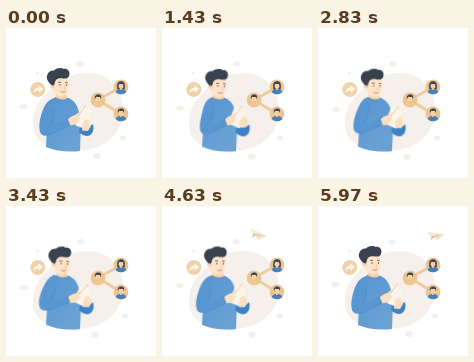
These frames come from a looping animation (150 by 150 pixels, 6030 ms). An HTML page:

```html
<!DOCTYPE html>
<html lang="en">
<head>
<meta charset="utf-8">
<title>Sharing with a network</title>
<style>
html, body { margin: 0; width: 100%; height: 100%; overflow: hidden; background: #fff; }
svg { display: block; width: 100vw; height: 100vh; }
svg * { transform-box: view-box; }
.lean, .head, .pad, .grip, .arm, .plane { animation: 6030ms ease-in-out infinite; }
.lean { transform-origin: 57px 123px; animation-name: lean; }
.head { transform-origin: 55px 68px; animation-name: nod; }
.pad { transform-origin: 77px 94px; animation-name: tilt; }
.grip { animation-name: grip; }
.arm { transform-origin: 68px 92px; animation-name: arm; }
.plane { animation-name: fly; animation-timing-function: linear; }
.float { animation: float 6030ms ease-in-out infinite; }
.right { --x: 2px; --y: 0px; }
.left { --x: .5px; --y: 3px; }
.low { --x: -2px; --y: 1px; }
.high { --x: 1px; --y: -.3px; }

@keyframes float { 45% { transform: translate(var(--x), var(--y)); } }
@keyframes lean {
  0%, 84.5%, 100% { transform: rotate(0deg); }
  8.3%, 37%, 69.2% { transform: rotate(.9deg); }
  57% { transform: rotate(.6deg); }
}
@keyframes nod {
  0%, 84.5%, 100% { transform: rotate(0deg); }
  8.3%, 37%, 69.2% { transform: translate(.4px, 1px) rotate(2.5deg); }
  57% { transform: translateY(.6px) rotate(2.5deg); }
}
@keyframes tilt {
  0%, 84.5%, 100% { transform: rotate(0deg); }
  8.3%, 37%, 69.2% { transform: translate(-3px, -1.5px) rotate(3deg); }
  57% { transform: translate(-1.5px, -1px) rotate(5deg); }
}
@keyframes grip {
  0%, 84.5%, 100% { transform: translate(-2px, 4px); }
  8.3%, 37%, 69.2% { transform: translate(-1px, 0); }
  57% { transform: translate(-1.5px, 2px); }
}
@keyframes arm {
  0%, 84.5%, 100% { transform: none; }
  8.3%, 37% { transform: rotate(3deg) scaleX(.87); }
  57% { transform: rotate(6deg) scaleX(1); }
  69.2% { transform: rotate(3deg) scaleX(.96); }
}
@keyframes fly {
  0%, 61.9% { opacity: 0; transform: translate(36px, 52px) rotate(-50deg) scale(.4); }
  64.7% { opacity: 1; transform: translate(48px, 34px) rotate(-32deg) scale(.85); }
  69.2% { opacity: 1; transform: translate(67px, 25px) rotate(2deg); }
  74.1% { opacity: 1; transform: translate(88px, 27px) rotate(10deg); }
  79.5% { opacity: 1; transform: translate(104px, 30px) rotate(11deg); }
  84.6% { opacity: 1; transform: translate(115px, 31px) rotate(6deg); }
  94.5%, 100% { opacity: 1; transform: translate(118px, 29.5px) rotate(-8deg); }
}
</style>
</head>
<body>
<svg viewBox="0 0 150 150" aria-hidden="true">
  <defs>
    <linearGradient id="knit" x1="0" y1="0" x2=".6" y2="1">
      <stop offset="0" stop-color="#5595d1"/>
      <stop offset="1" stop-color="#6aa2d4"/>
    </linearGradient>
  </defs>

  <!-- backdrop -->
  <g fill="#f5f0eb">
    <path d="M27 97C27 78 34 72 46 60C57 49 69 45 82 45C103 45 117 61 117 82C117 106 98 123 70 123C45 123 27 115 27 97Z"/>
    <ellipse class="float high" cx="74" cy="36" rx="3.7" ry="2.8"/>
    <ellipse class="float left" cx="17.5" cy="78.5" rx="4" ry="2.8"/>
    <ellipse class="float low" cx="90.8" cy="128" rx="3.8" ry="2.9"/>
    <ellipse class="float right" cx="117" cy="110" rx="3.2" ry="2.4"/>
    <ellipse cx="31.5" cy="45" rx="1.6" ry="1.2"/>
  </g>

  <!-- share badge -->
  <circle cx="31.8" cy="61.5" r="7.5" fill="#f0d2a9"/>
  <path d="M27.5 65.2C27.8 61.2 29.8 59.7 32.5 59.500V57.300L37 61L32.900 64.700V62.500C30.400 62.400 29 63.300 27.500 65.200Z" fill="#fff7ec"/>

  <!-- network -->
  <path d="M115 59L92 72L115 86" fill="none" stroke="#efcb9c" stroke-width="2.8"/>
  <g id="people"></g>

  <!-- man -->
  <g class="lean">
    <path d="M46 71C50 68 61 68 66 72C72 76 74 86 75 96L74 123Q55 125 40 119L41 99C38 89 40 75 46 71Z" fill="url(#knit)"/>
    <path d="M50 65L60 66L61 71Q56 74 50 70Z" fill="#f5cfaa"/>
    <path d="M49 69.500Q56 74 62.500 70.500" fill="none" stroke="#4d84bf" stroke-width=".8"/>

    <g class="head">
      <path d="M46.500 51C48 46 60 46 62 51L62.500 59C62.300 65 59 68.500 55.500 68.500C50.500 68.500 47 64 46.500 58Z" fill="#fee3c9"/>
      <circle cx="46.400" cy="58.300" r="2.300" fill="#f8d2ae"/>
      <path d="M45.500 57C42 54 39.500 50 41.500 46.500C42.500 43 46 42 48 42.500C51 39.500 56 39.500 57.500 41C61 40 64 43 63.400 46.500C63 50 60 51 57 50.500C54 50 51.500 50 50 52C48.600 53.500 49 56 47.800 57.500Z" fill="#39424e"/>
      <path d="M52 54.500L55 54.300M59 54.300L61.600 54.700" stroke="#39424e" stroke-width=".7"/>
      <g fill="#39424e"><circle cx="54" cy="57" r=".7"/><circle cx="60.500" cy="57" r=".7"/></g>
      <path d="M58 57.500L59 61L57.500 61.200" fill="none" stroke="#e9b78d" stroke-width=".6"/>
      <path d="M54.500 63.500Q57 65.300 59.500 63.300" fill="none" stroke="#b66f54" stroke-width=".7"/>
    </g>

    <path d="M74 98Q82 101 87 96C88.500 103 86 107.500 81 108Q77 108 73 104Z" fill="#3d82c8"/>
    <g class="pad">
      <path d="M74.500 79.500Q75 78.500 76 78.800L85.500 82.300Q86.500 82.800 86.200 83.800L81 100.300Q80.500 101.300 79.500 101L70 97.500Q69 97 69.400 96Z" fill="#fbf4ea" stroke="#ebe2d6" stroke-width=".4"/>
    </g>
    <g class="grip">
      <path d="M78.500 93C80 87.500 83 86.500 85 89L87 94L84 99L78 98.500Z" fill="#fbdfc0"/>
    </g>
    <g class="arm">
      <path d="M61 92Q65 88 69 87L74.500 83.500L75.200 84.500L72 88.500L74 90.500L71 95Q67 98 63 97Z" fill="#fbdfc0"/>
      <path d="M72 88L80 77" stroke="#e9bd92" stroke-width=".7"/>
      <path d="M46 71C39 73 35 85 33.500 95C32.500 104 35 109 41 107.500C49 105 57 101 64 97L61 90.500C55 94 49 97 44.500 98.500C48 90 49 81 46 71Z" fill="#5896d2"/>
      <path d="M64 97L61 90.500M44.500 98.500C47.500 92 48.500 86 48 80M41 107.500C48 105 55 102 63 97" fill="none" stroke="#4a81bc" stroke-width=".6"/>
    </g>
  </g>

  <!-- paper plane -->
  <g class="plane">
    <path d="M8 0L-8-4L-4.500 0Z" fill="#f8eee1" stroke="#e6cdac" stroke-width=".45"/>
    <path d="M8 0L-4.500 0L-6 4.500L-2.500 1.500Z" fill="#ddbd94"/>
    <path d="M8 0L-2.500 1.500L1 5.200Z" fill="#f3e3cd"/>
  </g>
</svg>
<script>
const avatar = (x, y, shirt, long) => `
  <g transform="translate(${x} ${y})">
    <circle r="7.4" fill="#ecc593"/>
    ${long ? '<path d="M-3.600 2.500C-4.600-3-3.300-5.600 0-5.600S4.600-3 3.600 2.500Z" fill="#3a4656"/>' : ''}
    <path d="M-5.400 5C-4.500 2.200-2 1.900 0 1.900S4.500 2.200 5.400 5A7.400 7.400 0 0 1-5.400 5Z" fill="${shirt}"/>
    <path d="M-1.200 0H1.200V2.500Q0 3.500-1.200 2.500Z" fill="#eeba85"/>
    <ellipse cy="-1.200" rx="2.500" ry="3" fill="#f8d0a3"/>
    <path d="M-3-1C-3.800-4-2-5.700.3-5.500C3-5.500 3.700-3.500 2.900-1L2-3Q0-2.800-1.800-3.300Z" fill="#3a4656"/>
  </g>`;
document.getElementById('people').innerHTML =
  avatar(92, 72, '#efc995', false) +
  avatar(115, 59, '#4580bb', true) +
  avatar(115, 86, '#4580bb', false);
</script>
</body>
</html>
```
